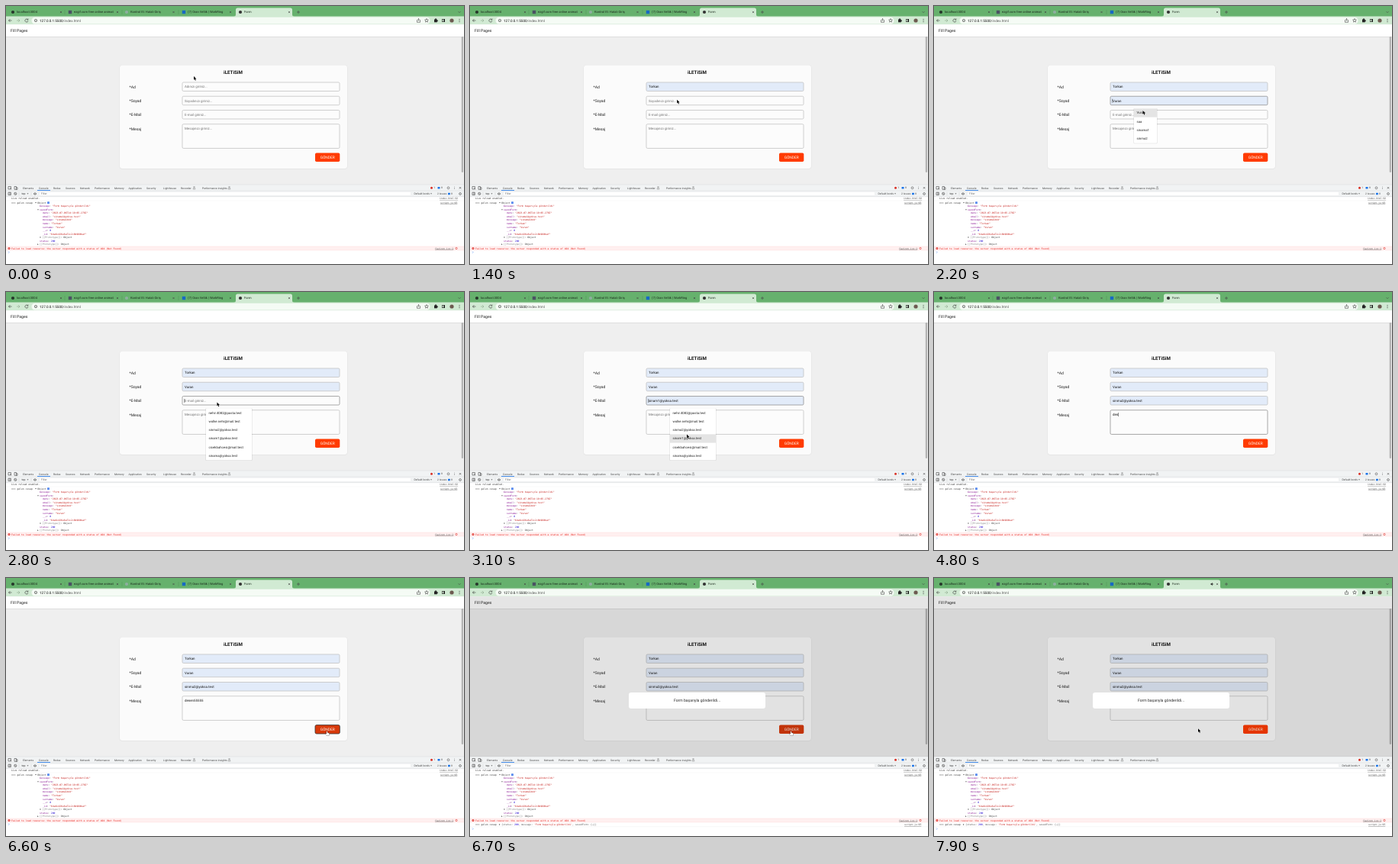
An HTML page for the animation above (8000 ms loop, 600 by 338 pixels).

```html
<!DOCTYPE html>
<html lang="tr">
<head>
<meta charset="utf-8">
<title>Form</title>
<style>
html, body { margin: 0; width: 100%; height: 100%; overflow: hidden; background: #fff; }
svg { display: block; width: 100vw; height: 100vh; }
text { font-family: Roboto, Arial, sans-serif; text-rendering: geometricPrecision; white-space: pre; }
.mono { font-family: "DejaVu Sans Mono", monospace; }
</style>
</head>
<body>
<svg id="stage" viewBox="0 0 600 338" preserveAspectRatio="none"><g id="base"></g><g id="live"></g></svg>
<script>
const LOOP = 8000, MONO = 3.08, CHAR = MONO * 0.602;

const rect = (x, y, w, h, fill, extra = '') =>
  `<rect x="${x}" y="${y}" width="${w}" height="${h}" fill="${fill}" ${extra}/>`;
const dot = (x, y, r, fill) => `<circle cx="${x}" cy="${y}" r="${r}" fill="${fill}"/>`;
const line = (d, color = '#444', w = 0.6) =>
  `<path d="${d}" fill="none" stroke="${color}" stroke-width="${w}"/>`;
const shape = (d, fill) => `<path d="${d}" fill="${fill}"/>`;
// y is the vertical middle of the lowercase text
const text = (x, y, s, size, fill = '#222', extra = '') =>
  `<text x="${x}" y="${y + size * 0.34}" font-size="${size}" fill="${fill}" ${extra}>${s}</text>`;
const cross = (x, y, r = 1.1) => line(`M${x - r} ${y - r}l${2 * r} ${2 * r}m0 ${-2 * r}l${-2 * r} ${2 * r}`);
const right = (x, y) => shape(`M${x} ${y - 1}l1.6 1l-1.6 1z`, '#666');
const down = (x, y) => shape(`M${x} ${y - 0.7}h2l-1 1.5z`, '#666');
const ring = (x, y, r, color = '#444') =>
  `<circle cx="${x}" cy="${y}" r="${r}" fill="none" stroke="${color}" stroke-width=".6"/>`;

// Monospace line made of [string, colour] parts
const code = (x, y, ...parts) => parts.map(([s, color]) => {
  const out = text(x, y, s, MONO, color, 'class="mono"');
  x += s.length * CHAR;
  return out;
}).join('');
const link = (x, y, s) => text(x, y, s, MONO, '#444', 'class="mono" text-decoration="underline"');

function browser() {
  let s = rect(0, 0, 600, 14, '#66b16d') + rect(0, 13.5, 600, 11, '#d1ead3');
  s += shape('M298 14q3 0 3-3V5q0-2.500 2.500-2.500h69q2.500 0 2.500 2.500v6q0 3 3 3z', '#d1ead3');
  const tabs = [
    [9, 'localhost:3004', '#27372b'],
    [84, 'ezgif.com free online animat', '#4a5263'],
    [158, 'Kontrol Et: Hatalı Giriş', '#8faea0'],
    [233, '(7) Oran Veltik | WorkRing', '#1769c4'],
    [307, 'Form', '#333']
  ];
  tabs.forEach(([x, name, color], i) => {
    s += i == 3 || i == 1 ? rect(x - 2.2, 5.8, 4.4, 4.4, color) : dot(x, 8, 2.1, color);
    s += text(x + 5, 8, name, 4.1, '#1c2a1e') + cross([72, 146, 219.5, 294, 371][i], 8);
    if (i < 3) s += line(`M${x + 68} 5v6`, '#4b8e52', 0.4);
  });
  s += line('M383 6v4m-2-2h4') + line('M592.500 7.200l1.500 1.500l1.500-1.500');
  s += line('M7.500 19h-4m1.800-1.800l-1.800 1.800l1.800 1.800', '#333');
  s += line('M14 19h4m-1.800-1.800l1.800 1.800l-1.800 1.800', '#8aa58c');
  s += line('M28.500 17.800a2 2 0 1 0 .4 1.700m0-3v1.600h-1.600', '#333');
  s += rect(33.5, 14.8, 522, 8.6, '#f5fbf5', 'rx="4.3"');
  s += ring(39, 19, 1.7) + line('M39 18.500v1.500');
  s += text(44, 19, '127.0.0.1:5500<tspan fill="#555">/index.html</tspan>', 4.6, '#111');
  s += line('M539.300 18.500h-.8v2.800h4v-2.800h-.8m-1.200 1.200v-3.200m-1 1l1-1l1 1');
  s += line('M551 16.500l.7 1.600l1.700.1l-1.300 1.100l.4 1.800l-1.500-.9l-1.500.9l.4-1.800l-1.300-1.100l1.700-.1z');
  s += rect(561, 17.5, 3.8, 3.8, '#222') + dot(563, 17.2, 0.9, '#222') + dot(565, 19.3, 0.9, '#222');
  s += rect(571, 17, 4, 4, '#222') + rect(571.6, 17.6, 1.8, 2.8, '#d1ead3');
  s += dot(584, 19, 2.6, '#6d5a50');
  return s + [17.3, 19, 20.7].map(y => dot(594, y, 0.5, '#333')).join('');
}

function page() {
  let s = rect(0, 24, 600, 210, '#efefef');
  s += rect(0, 40, 600, 1, '#dedede') + rect(0, 24.3, 600, 15.7, '#fff');
  s += text(6, 32.6, 'Fill Pages', 5.2);
  s += rect(596.7, 40, 2.4, 178, '#b4b4b4', 'rx="1.2"');
  s += rect(148.5, 77.3, 299, 136.5, '#e2e2e2', 'rx="4"') + rect(149, 77.5, 298, 135.5, '#fbfbfb', 'rx="3.5"');
  s += text(297.5, 87, 'iLETiSiM', 6.2, '#111', 'font-weight="700" text-anchor="middle"');
  ['*Ad', '*Soyad', '*E-Mail', '*Mesaj'].forEach((label, i) => s += text(161.5, 106 + i * 18.3, label, 5.05));
  return s;
}

function devtools() {
  let s = rect(0, 234, 600, 104, '#fff') + rect(0, 234, 600, 16, '#f1f3f4');
  s += line('M0 234h600M0 242h600M0 249.700h600', '#cfd1d4', 0.4);
  s += line('M3 236.500h3.500v3.500h-3.500zM5 238.200l2 2') + line('M11 236.500h2.500v3.800h-2.500zM13.500 237.700h1.500v2.600h-2');
  const tabs = { Elements: 22, Console: 43, Redux: 62, Sources: 78, Network: 97, Performance: 116, Memory: 142,
    Application: 160.5, Security: 184, Lighthouse: 206, Recorder: 229, 'Performance insights': 257 };
  for (const name in tabs) s += text(tabs[name], 238.4, name, 3.45, '#444');
  s += rect(41, 241.2, 17, 0.8, '#1a73e8');
  for (const x of [245.5, 291.5]) s += line(`M${x} 236.800h2m-1.500 0v1.300l-1 1.800h3l-1-1.800v-1.300`, '#555', 0.4);
  s += dot(557.5, 238.3, 1.5, '#d93025') + text(560.3, 238.3, '1', 3.3, '#444');
  s += rect(565.5, 237, 3, 2.6, '#1a73e8', 'rx=".5"') + text(570, 238.3, '8', 3.3, '#444');
  s += ring(579.5, 238.3, 1.4) + cross(595, 238.3, 1.2);
  s += [236.9, 238.3, 239.7].map(y => dot(587.5, y, 0.4, '#444')).join('');

  s += line('M3 244.200h3.400v3.400h-3.400zM5 244.200v3.400') + ring(12.3, 245.9, 1.6) + line('M11.200 244.800l2.200 2.200');
  s += text(20.5, 245.8, 'top', 3.45) + down(27.5, 246) + line('M17 243.500v5M33 243.500v5', '#ccc', 0.4);
  s += line('M36 246q2-2.800 4 0q-2 2.800-4 0') + dot(38, 246, 0.6, '#444');
  s += rect(43.5, 243.2, 487, 5.3, '#fff', 'stroke="#dadce0" stroke-width=".3"') + text(46, 245.9, 'Filter', 3.45, '#666');
  s += text(534.5, 245.9, 'Default levels', 3.45, '#444') + down(556, 246);
  s += text(565, 245.9, '2 Issues:', 3.3, '#444') + rect(579, 244.7, 2.8, 2.5, '#1a73e8', 'rx=".5"') + text(583, 245.9, '8', 3.3, '#444');
  s += ring(595, 246, 1.4);

  const dark = '#303030', key = '#881391', str = '#c41a16', num = '#1c00cf';
  s += code(7, 252, ['Live reload enabled.', dark]) + link(568, 252, 'index.html:92');
  s += line('M0 255h600', '#eee', 0.4);
  s += code(7, 257.6, ['==> gelen cevap', dark]) + down(38, 257.6) + code(41.3, 257.6, ['Object', dark]);
  s += rect(54, 256.2, 3, 3, '#5b8def', 'rx=".6"') + link(569, 257.6, 'script.js:95');
  const pairs = [
    [44, 'message', '"Form başarıyla gönderildi"', str],
    [44, 'savedForm', '', dark],
    [48, 'date', '"2023-07-06T14:19:05.278Z"', str],
    [48, 'email', '"sinama1@yoksa.test"', str],
    [48, 'message', '"sinama1444"', str],
    [48, 'name', '"Torkan"', str],
    [48, 'surname', '"Vuran"', str],
    [48, '__v', '0', num],
    [48, '_id', '"64a6cd26e6a71c2c8b960baf"', str],
    [47.5, '[[Prototype]]', 'Object', dark],
    [44, 'status', '200', num],
    [44, '[[Prototype]]', 'Object', dark]
  ];
  pairs.forEach(([x, name, value, color], i) => {
    const y = 262.3 + i * 4.53, proto = name[0] == '[';
    if (proto) s += right(x - 3, y);
    if (!value) s += down(x - 3, y);
    s += code(x, y, [name, proto ? '#777' : key], [': ', dark], [value, color]);
  });
  s += rect(0, 315, 600, 5, '#fff0f0') + line('M0 315h600M0 320h600', '#ffd6d6', 0.4);
  s += dot(4, 317.5, 1.5, '#e0332c') + line('M3.300 316.800l1.400 1.400m0-1.400l-1.400 1.400', '#fff', 0.4);
  s += code(7, 317.5, ['Failed to load resource: the server responded with a status of 404 (Not Found)', '#e8201a']);
  s += link(562, 317.5, 'favicon.ico:1') + ring(590, 317.5, 1.2, '#e0332c');
  return s;
}

const menus = [
  { open: 500, close: 1100, top: 116.2, w: 30, rows: ['Torkan', 'saa', 'sinama1', 'sinma2'], pick: 0 },
  { open: 1800, close: 2400, top: 134.4, w: 30, rows: ['Vuran', 'saa', 'sinama1', 'sinma2'], pick: 0 },
  { open: 2700, close: 3700, top: 152.6, w: 60, pick: 2, rows: ['nehir.4082@posta.test', 'wolke.nehr@mail.test',
    'sinma2@yoksa.test', 'sinam1@yoksa.test', 'cicekbahcesi@mail.test', 'sinama@yoksa.test'] }
];
const hints = ['Adınızı giriniz...', 'Soyadınızı giriniz...', 'E-mail giriniz...', 'Mesajınızı giriniz...'];
const ROW = 11.25, MESSAGE = 'denen55555';
const keyTimes = [4600, 4700, 4800, 4950, 5200, 5500, 5600, 5700, 5800, 5900];
const path = [
  [0, 246, 92], [400, 250, 104], [700, 250, 104], [1000, 270, 121], [1150, 270, 121], [1600, 272, 124],
  [1850, 272, 124], [2150, 273.5, 137], [2400, 273.5, 137], [2600, 276, 142], [2750, 276, 142],
  [3100, 284, 186.5], [3300, 284, 186.5], [3500, 280, 178], [3700, 280, 178], [4100, 277, 171],
  [5900, 277, 171], [6350, 420.5, 201], [7250, 420.5, 201], [7900, 346, 197.3], [LOOP, 346, 197.3]
];

function pointer(t) {
  const i = path.findIndex(p => p[0] > t), [t0, x0, y0] = path[i - 1], [t1, x1, y1] = path[i];
  const p = (t - t0) / (t1 - t0), e = p * p * (3 - 2 * p);
  return [x0 + (x1 - x0) * e, y0 + (y1 - y0) * e];
}

function field(i, value, focus, auto) {
  const y = 100 + i * 18.25;
  return rect(231, y, 206, i == 3 ? 31.7 : 11.5, auto ? '#e2ebf9' : '#fcfcfc',
    `rx="1.5" stroke="${focus ? '#858585' : '#bcbcbc'}" stroke-width=".7"`) +
    text(234, y + 5.9, value || hints[i], 4.42, value ? '#111' : '#757575');
}

const caret = (x, y) => line(`M${x} ${y - 2.5}v5`, '#111', 0.5);

function live(t) {
  const [cx, cy] = pointer(t), sent = t >= 6700;
  const hover = cx > 405 && cx < 437 && cy > 192.5 && cy < 204;
  let s = '', popup = '';

  menus.forEach((m, i) => {
    const shown = t >= m.open && t < m.close;
    const over = shown && cx > 262 && cx < 262 + m.w ? Math.floor((cy - m.top) / ROW) : -1;
    const value = t >= m.close ? m.rows[m.pick] : m.rows[over];
    s += field(i, value, shown, value);
    if (!shown) return;
    s += caret(233.8, 106 + i * 18.25);
    const h = m.rows.length * ROW;
    popup += rect(261.5, m.top - 0.3, m.w + 1, h + 1.2, '#000', 'opacity=".13" rx="1"');
    popup += rect(262, m.top - 0.4, m.w, h + 0.8, '#fff', 'rx=".8"');
    m.rows.forEach((row, k) => {
      const y = m.top + k * ROW;
      if (k == over) popup += rect(262, y, m.w, ROW, '#e4e4e4');
      popup += text(265.5, y + ROW / 2, row, 4.3);
    });
  });

  const typed = sent ? '' : MESSAGE.slice(0, keyTimes.filter(k => k <= t).length);
  s += field(3, typed, t > 4100 && t < 6550);
  if (t > 4150 && t < 5900) s += '<g id="caret"></g>';
  const pressed = t >= 6550 && !sent;
  s += rect(405, 192.6, 32.3, 11.4, hover ? '#d83a0b' : '#ff3b00',
    `rx="1.8" ${pressed ? 'stroke="#333" stroke-width=".8"' : ''}`);
  s += text(421.2, 198.4, 'GÖNDER', 4.85, '#fff', 'text-anchor="middle"');

  if (sent) {
    s += rect(0, 24.3, 600, 209.7, '#000', 'opacity=".1"');
    s += rect(208, 150, 179, 21, '#fff', 'rx="3"');
    s += text(297.5, 160.4, 'Form başarıyla gönderildi...', 5.08, '#222', 'text-anchor="middle"');
    s += line('M0 325.700h600', '#eee', 0.4) + code(7, 323, ['==> gelen cevap', '#303030']) + right(38, 323);
    s += code(41.3, 323, ["{status: ", '#555'], ['200', '#1c00cf'], [', message: ', '#555'],
      ["'Form başarıyla gönderildi'", '#c41a16'], [', savedForm: {…}}', '#555']);
    s += link(569, 323, 'script.js:95');
  }
  s += line(`M3 ${sent ? 327.4 : 321.4}l1.200 1.200l-1.200 1.200`, '#367cf1', 0.5);
  if (t >= 7000) s += shape('M362.500 7.200h1l1.300-1.200v4l-1.300-1.200h-1z', '#222') + line('M365.500 7q.8 1 0 2', '#222', 0.4);
  s += popup;

  if (t < 4600 || t >= 5900) {
    const hand = hover && t < 7250;
    const d = hand
      ? 'M-.5 0q.6-.6 1 0v1.800l2.100.5q.5.300.4 1l-.5 2.200h-2.800l-1.700-2.300q.2-.8 1.500.1z'
      : 'M0 0v4.800l1.100-1l.8 1.900l.9-.4l-.8-1.800h1.500z';
    s += `<path transform="translate(${cx} ${cy})" d="${d}" fill="${hand ? '#fff' : '#000'}" ` +
      `stroke="${hand ? '#111' : '#fff'}" stroke-width=".5" paint-order="stroke"/>`;
  }
  return s;
}

const base = document.getElementById('base'), layer = document.getElementById('live');
base.innerHTML = browser() + page() + devtools();
const pen = document.createElement('canvas').getContext('2d');
pen.font = '44.2px Roboto, Arial, sans-serif';

function frame(now) {
  const t = now % LOOP;
  layer.innerHTML = live(t);
  const mark = document.getElementById('caret');
  if (mark) {
    const typed = MESSAGE.slice(0, keyTimes.filter(k => k <= t).length);
    mark.innerHTML = caret(234.2 + pen.measureText(typed).width / 10, 160.6);
  }
  requestAnimationFrame(frame);
}
requestAnimationFrame(frame);
</script>
</body>
</html>
```
